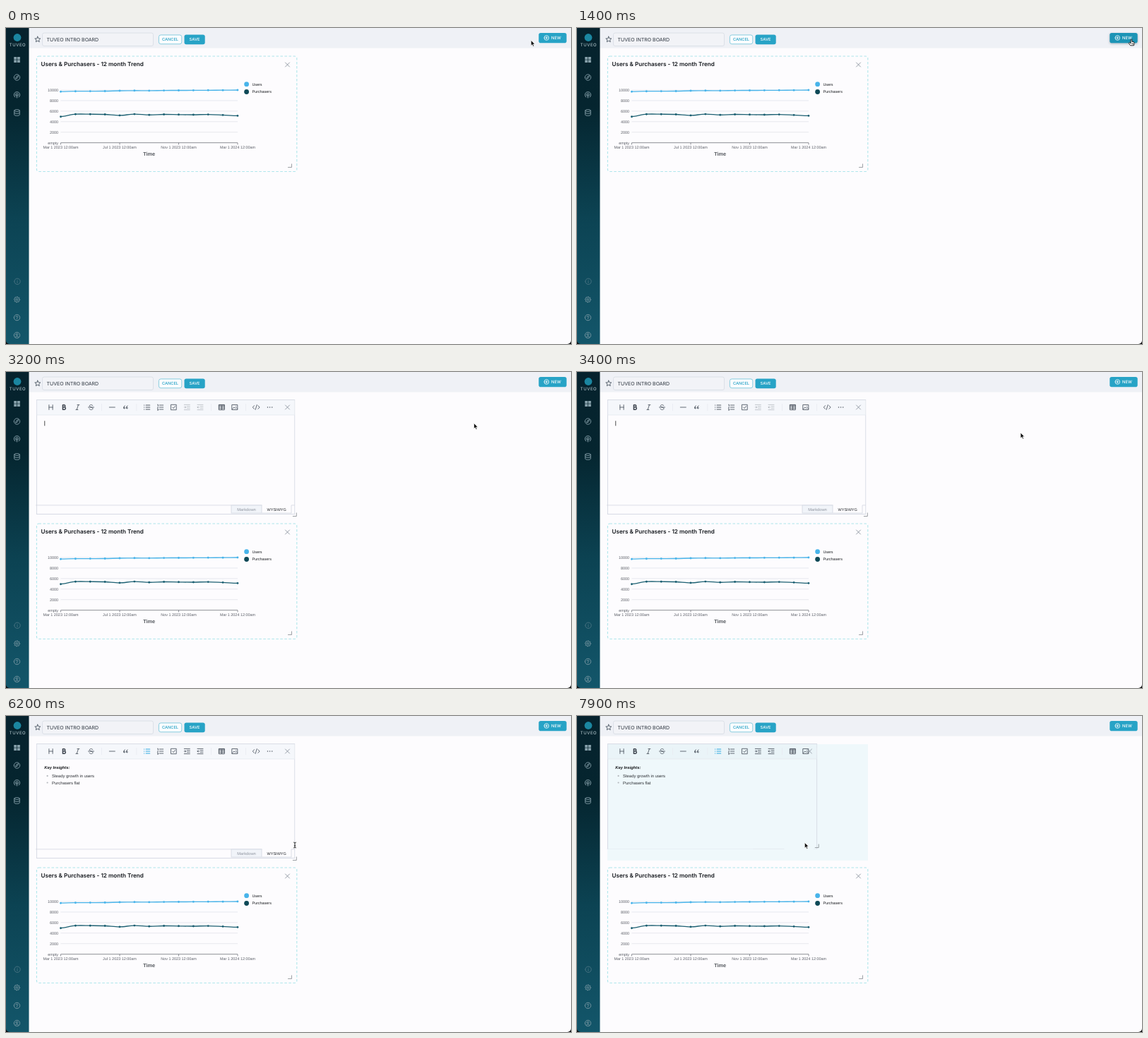
These frames come from a looping animation (800 by 448 pixels, 8000 ms). An HTML page:

```html
<!DOCTYPE html>
<html lang="en">
<head>
<meta charset="utf-8">
<title>Dashboard</title>
<style>
html, body { margin: 0; width: 100%; height: 100%; overflow: hidden; background: #fdfcfe; }
svg { display: block; width: 800px; height: 448px; text-rendering: geometricPrecision; }
text { font-family: Inter, sans-serif; }
.chart, .chart text, .doc text { font-family: "Liberation Sans", Arial, sans-serif; }
.line { fill: none; stroke: currentColor; stroke-linecap: round; stroke-linejoin: round; }
</style>
</head>
<body>
<svg id="stage" viewBox="0 0 800 448" xmlns="http://www.w3.org/2000/svg"></svg>
<script>
const LOOP = 8000, STEP = 100;
const stage = document.getElementById('stage');

// Markup helpers
const rect = (x, y, w, h, fill, more = '') =>
  `<rect x="${x}" y="${y}" width="${w}" height="${h}" fill="${fill}" ${more}/>`;
const text = (x, y, size, fill, str, more = '') =>
  `<text x="${x}" y="${y}" font-size="${size}" fill="${fill}" ${more}>${str}</text>`;
const dot = (x, y, r, fill, more = '') =>
  `<circle cx="${x}" cy="${y}" r="${r}" fill="${fill}" ${more}/>`;
const icon = (x, y, color, d, width = 0.9, id = '') =>
  `<path ${id && `id="${id}"`} class="line" transform="translate(${x} ${y})" color="${color}" stroke-width="${width}" d="${d}"/>`;
const ring = (r, x = 0, y = 0) =>
  `M${x - r} ${y}a${r} ${r} 0 1 0 ${2 * r} 0a${r} ${r} 0 1 0 ${-2 * r} 0`;
const MID = 'text-anchor="middle"', END = 'text-anchor="end"';
const CROSS = 'M-3 -3L3 3M3 -3L-3 3';
const PICTURE = 'M-3.8 -3.5h7.6v7h-7.6zM-3.4 2.4l2.3 -2.6l1.6 1.7l1.3 -1.2l1.8 2M1.5 -1.4h.3';

function starPath(r) {
  let d = '';
  for (let i = 0; i < 10; i++) {
    const a = Math.PI * (i / 5 - 0.5), k = i % 2 ? r * 0.46 : r;
    d += (i ? 'L' : 'M') + (k * Math.cos(a)).toFixed(2) + ' ' + (k * Math.sin(a)).toFixed(2);
  }
  return d + 'z';
}

function gearPath() {
  let d = ring(1.4);
  for (let i = 0; i <= 32; i++) {
    const a = i * Math.PI / 16, r = i % 4 < 2 ? 4.1 : 3.1;
    d += (i ? 'L' : 'M') + (r * Math.cos(a)).toFixed(2) + ' ' + (r * Math.sin(a)).toFixed(2);
  }
  return d;
}

function sidebar() {
  const c = '#86a0aa', dim = '#527987';
  return rect(0, 0, 32.5, 448, 'url(#side)') +
    dot(16, 13.5, 5.4, '#1b86a0') +
    text(16.5, 25.6, 6, '#c3d5da', 'TUVEO', `${MID} letter-spacing=".55"`) +
    [[11.2, 41], [15.9, 41], [11.2, 45.3], [15.9, 45.3]].map(p => rect(...p, 4, 3.7, c)).join('') +
    icon(15.5, 70, c, ring(4.2) + 'M2 -2L.8 .8L-2 2L-.8 -.8z') +
    icon(15.5, 95, c, 'M-2.6 3.1a4.2 4.2 0 1 1 5.2 0M-1.6 1.2a2.1 2.1 0 1 1 3.2 0M0 .2V4' + ring(0.5), 1) +
    icon(15.5, 120, c, 'M-3.8 -3a3.8 1.4 0 1 0 7.6 0a3.8 1.4 0 1 0 -7.6 0V3a3.8 1.4 0 0 0 7.6 0V-3M-3.8 0a3.8 1.4 0 0 0 7.6 0') +
    icon(16, 359.3, dim, ring(4.2) + 'M0 -.4V2M0 -2v.1', 0.8) +
    icon(15.5, 385, c, gearPath(), 0.8) +
    icon(15.5, 410.5, c, ring(4.2) + 'M-1.3 -.9a1.3 1.3 0 1 1 1.9 1.1q-.6 .3 -.6 .9M0 2.3v.1', 0.8) +
    icon(15.5, 435.5, c, ring(4.2) + ring(1.4, 0, -1) + 'M-2.6 3a2.8 2.2 0 0 1 5.2 0', 0.8);
}

function header() {
  const blue = '#27a3c6';
  return rect(32.5, 0, 767.5, 28.5, '#eff1f6') +
    icon(44.8, 16.3, '#4d5865', starPath(4.2), 0.9) +
    rect(51.5, 7, 157, 18.5, '#f2f3f7', 'rx="2.5" stroke="#dadee6" stroke-width=".9"') +
    text(57.5, 18.9, 7, '#2e3640', 'TUVEO INTRO BOARD') +
    rect(216.4, 9.9, 32.4, 12.8, '#fafcfe', 'rx="2.8" stroke="#7fcadd" stroke-width=".9"') +
    text(232.5, 18.3, 5.7, blue, 'CANCEL', `${MID} font-weight="500"`) +
    rect(252.5, 9.5, 29.2, 13.8, blue, 'rx="2.8"') +
    text(267, 18.4, 5.75, '#fff', 'SAVE', `${MID} font-weight="500"`) +
    rect(754.3, 7, 39.4, 14.2, blue, 'id="newBtn" rx="2.8"') +
    icon(765.3, 14, '#fff', ring(3.3) + 'M-1.6 0h3.2M0 -1.6v3.2', 0.8) +
    text(779, 16.1, 5.85, '#fff', 'NEW', `${MID} font-weight="500"`);
}

// Smooth curve through evenly spaced points
function series(ys, color) {
  const px = i => 77.5 + i * 20.87;
  const at = i => ys[Math.max(0, Math.min(ys.length - 1, i))];
  let d = `M${px(0)} ${ys[0]}`, marks = '';
  ys.forEach((y, i) => {
    marks += dot(px(i), y, 1.45, color);
    if (!i) return;
    const s0 = (at(i) - at(i - 2)) / 6, s1 = (at(i + 1) - at(i - 1)) / 6;
    d += `C${px(i - 1) + 6.96} ${at(i - 1) + s0} ${px(i) - 6.96} ${y - s1} ${px(i)} ${y}`;
  });
  return `<path class="line" color="${color}" stroke-width="1.35" d="${d}"/>` + marks;
}

function chartCard() {
  const ink = '#5a5e66';
  let s = rect(43.4, 40, 368.4, 163.5, '#fdfcfe',
    'rx="3" stroke="#aee6ec" stroke-width="1.1" stroke-dasharray="3.6 2.4"') +
    text(49.5, 54, 8.15, '#14181d', 'Users &amp; Purchasers - 12 month Trend', 'font-weight="600"') +
    icon(398.5, 52, '#7d8792', CROSS, 0.8) +
    icon(404.5, 197.5, '#85898f', 'M0 -4.6V0H-5', 0.8) + '<g class="chart">';
  ['10000', '8000', '6000', '4000', '2000', 'empty'].forEach((label, i) => {
    const y = 88 + i * 14.95, axis = i === 5;
    s += rect(77.5, y - 0.4, 250.5, 0.8, axis ? '#70747c' : '#e1e3ea') +
      text(74, y + 1.8, 5.45, ink, label, END);
  });
  ['Mar 1 2023', 'Jul 1 2023', 'Nov 1 2023', 'Mar 1 2024'].forEach((day, i) => {
    const x = 77.5 + i * 83.5;
    s += rect(x - 0.4, 162.8, 0.8, 2.6, '#70747c') +
      text(x, 170.8, 5.45, ink, day + ' 12:00am', MID);
  });
  s += text(202.6, 181, 7.3, '#55595f', 'Time', `${MID} font-weight="bold"`);
  s += series([90.2, 89.7, 89.6, 89.5, 89, 88.8, 88.9, 88.6, 88.5, 88.4, 88.3, 88.2, 88], '#48b4ea');
  s += series([125.7, 122.2, 122.2, 122.5, 123.9, 122.1, 123.2, 122.5, 122.8, 123, 122.6, 123.4, 124.4], '#1c6072');
  [['Users', '#48b4ea'], ['Purchasers', '#0e4957']].forEach(([name, color], i) => {
    s += dot(340.6, 79.7 + i * 10.8, 3.4, color) + text(348.4, 81.6 + i * 10.8, 5.45, '#15181c', name);
  });
  return s + '</g>';
}

function toolbar() {
  const c = '#525a65', y = 50;
  const rows = (x0, x1) => [-3, 0, 3].map(v => `M${x0} ${v}H${x1}`).join('');
  const indent = arrow => 'M-4 -3.6h8M0 -1.2h4M0 1.2h4M-4 3.6h8' + arrow;
  return [135, 184.5, 290, 339].map(x => rect(x, 45, 0.7, 10, '#e7e9ef')).join('') +
    icon(63.5, y, c, 'M-2.6 -3.4V3.4M2.6 -3.4V3.4M-2.6 0H2.6') +
    icon(82.3, y, '#3f4650', 'M-1.9 -3.2V3.2H.7a1.75 1.75 0 0 0 0 -3.4H-1.9M-1.9 -3.2H.3a1.55 1.55 0 0 1 0 3', 1.5) +
    icon(101.3, y, c, 'M-.4 -3.4h3M-2.4 3.4h3M1.2 -3.4L-1.1 3.4') +
    icon(120.5, y, c, 'M2.4 -2.3C1.6 -4 -2.3 -3.9 -2.3 -1.7C-2.3 .2 2.5 -.3 2.5 1.9C2.5 4 -1.8 4.2 -2.6 2.1M-4 0H4') +
    icon(150.3, y, c, 'M-4 0H4') +
    icon(169.5, y, c, ring(0.9, -2, 1) + ring(0.9, 1.8, 1) + 'M-2.9 .8q0 -2 1.5 -3M.9 .8q0 -2 1.5 -3', 1) +
    icon(199.5, y, c, rows(-1.4, 4.2) + rows(-4, -3.8), 1.1, 'ul') +
    icon(218.5, y, c, rows(-1.2, 4.2) + 'M-3.9 -3.8h.7v2.2M-4 .2h1.1l-1 1.1M-4 2.6h1.1v1.6h-1.1', 0.9) +
    icon(237.5, y, c, 'M-3.7 -3.7h7.4v7.4h-7.4zM-1.9 0l1.4 1.5L2 -1.5') +
    icon(256.3, y, c, indent('M-4 0h2.4M-2.7 -1.2l1.2 1.2l-1.2 1.2'), 0.9, 'indent') +
    icon(275, y, c, indent('M-4 0h2.4M-2.9 -1.2l-1.2 1.2l1.2 1.2'), 0.9, 'outdent') +
    icon(305.5, y, c, 'M-3.8 -3.6h7.6v7.2h-7.6zM-3.8 -2.9h7.6M-3.8 -1h7.6M-3.8 1.3h7.6M0 -2V3.6', 1) +
    icon(324, y, c, PICTURE) +
    icon(354.2, y, c, 'M-2.6 -2.3L-5 0L-2.6 2.3M2.6 -2.3L5 0L2.6 2.3M1 -3.4L-1 3.4') +
    [370.5, 373.6, 376.7].map(x => dot(x, y, 0.8, c)).join('');
}

// Editor lines: text, x, baseline, typing start and end
const LINES = [
  ['Key Insights:', 54.3, 75.3, 5000, 5350],
  ['Steady growth in users', 65, 87.3, 5400, 5750],
  ['Purchasers flat', 65, 96.9, 5800, 6050]
];

function editor() {
  const edge = '#d3d8e2';
  return rect(43, 40, 369, 165, '#eff8fb', 'id="slot"') +
    '<g clip-path="url(#crop)">' +
    rect(43.4, 39.6, 365.4, 162, '#fdfcfe', `id="frame" stroke="${edge}" stroke-width=".9"`) +
    rect(43.8, 40, 364.6, 21, '#f5f7fb', 'id="bar"') +
    rect(43.8, 60.6, 364.6, 0.7, '#e2e5ec', 'id="barLine"') + toolbar() +
    icon(398.5, 50, '#808a95', CROSS, 0.8, 'close') +
    '<g class="doc">' +
    LINES.map(([, x, y], i) =>
      (i ? dot(58.6, y - 2.4, 1.1, '#b4b7bc', `id="bullet${i}"`) : '') +
      text(x, y, i ? 5.92 : 5.75, i ? '#2c2f34' : '#17191c', '',
        `id="line${i}" ${i ? '' : 'font-weight="bold" font-style="italic"'}`)).join('') +
    rect(54.4, 69.3, 0.8, 7, '#222', 'id="caret"') +
    '<g id="tabs">' +
    rect(-30, 188.5, 392.5, 0.8, edge) + rect(404, 188.5, 5, 0.8, edge) +
    rect(319, 189, 43, 11, '#f1f4f9', `stroke="${edge}" stroke-width=".8"`) +
    rect(362.4, 199.6, 42, 0.8, edge) + rect(403.6, 189, 0.8, 11, edge) +
    text(340.5, 196.9, 5.75, '#8e949f', 'Markdown', MID) +
    text(383.2, 196.9, 5.5, '#22262b', 'WYSIWYG', MID) +
    '</g></g></g>' +
    icon(0, 0, '#85898f', 'M0 -4.6V0H-5', 0.8, 'grip');
}

function menu() {
  const c = '#56616e';
  return rect(727, 24.3, 66.5, 58.3, '#fff', 'rx="3" filter="url(#shade)"') +
    rect(730.5, 44.8, 58, 16.8, '#eef1f5', 'id="pick" rx="3" stroke="#aeb7c2" stroke-width=".8"') +
    icon(739.8, 35.8, c, 'M-3.2 -2.8h4.4M-1 -2.8V3M1.2 -.6h2.6M2.5 -.6V3', 1) +
    icon(739.8, 53.3, c, PICTURE, 0.8) +
    icon(739.8, 70.5, c, 'M-3.2 -3.2H3.2L.8 0V3.2L-.8 2.2V0z') +
    ['Text Panel', 'Image Panel', 'Filter Shortcut'].map((s, i) =>
      text(746, 37.6 + i * 17.3, 5.45, '#868d98', s)).join('');
}

// Rounded lower window corners
const corners = () =>
  '<path d="M0 443V448H5A5 5 0 0 1 0 443zM800 443V448H795A5 5 0 0 0 800 443z" fill="#0a0a0c"/>';

const POINTERS = {
  arrow: '<path d="M0 0V7.9L1.8 6.3L3.1 9L4.5 8.4L3.2 5.7H5.7z" fill="#111" stroke="#fff" stroke-width=".7"/>',
  hand: '<path d="M-.9 .6a.9 .9 0 0 1 1.8 0V3.2L3 3.5a1.4 1.4 0 0 1 1.2 1.5L3.5 8.6H-1.4L-3.6 5.6a.8 .8 0 0 1 1.2 -1L-.9 5.6zM1 5.4V7M2.4 5.4V7" fill="#fff" stroke="#111" stroke-width=".9" stroke-linejoin="round"/>',
  beam: '<path class="line" color="#222" stroke-width=".9" d="M-1.5 -3.9Q0 -3.9 0 -3V3Q0 3.9 -1.5 3.9M1.5 -3.9Q0 -3.9 0 -3M0 3Q0 3.9 1.5 3.9M-.8 .8H.8"/>'
};

stage.innerHTML = `<defs>
  <linearGradient id="side" x1="0" y1="0" x2="0" y2="1">
    <stop offset="0" stop-color="#06222d"/><stop offset=".25" stop-color="#05252f"/>
    <stop offset=".6" stop-color="#0c4353"/><stop offset="1" stop-color="#13566a"/>
  </linearGradient>
  <filter id="shade" x="-20%" y="-20%" width="140%" height="150%">
    <feDropShadow dx="0" dy="1" stdDeviation="1.6" flood-color="#26323f" flood-opacity=".36"/>
  </filter>
  <clipPath id="crop"><rect id="cropBox" x="42" y="39"/></clipPath>
</defs>` + rect(0, 0, 800, 448, '#fdfcfe') + header() + sidebar() + corners() +
  `<g id="card">${chartCard()}</g><g id="editor">${editor()}</g><g id="menu">${menu()}</g>` +
  '<g id="pointer">' + Object.keys(POINTERS).map(k => `<g id="${k}">${POINTERS[k]}</g>`).join('') + '</g>';

const el = {};
stage.querySelectorAll('[id]').forEach(n => el[n.id] = n);

const clamp = v => Math.max(0, Math.min(1, v));
const ease = v => v * v * (3 - 2 * v);
const span = (t, a, b) => ease(clamp((t - a) / (b - a)));
const mix = (a, b, k) => a + (b - a) * k;
const show = (node, on) => node.setAttribute('visibility', on ? 'inherit' : 'hidden');
const set = (node, attrs) => { for (const k in attrs) node.setAttribute(k, attrs[k]); };

const PRESS = 1700, OPEN = 1900, CLOSE = 2800, INSERT = 2900, GRAB = 7100, LAG = 130;

// Pointer path: time, x, y; the last drag runs on past the loop's end
const PATH = [
  [0, 743.3, 17.3], [200, 743.3, 17.3], [1100, 785, 16.2], [OPEN, 785, 16.2],
  [2300, 764.7, 51.3], [2400, 764.7, 51.3], [2650, 761, 34], [CLOSE, 761, 34],
  [3400, 628, 86], [3600, 628, 86], [4300, 291, 92], [5500, 291, 92],
  [6200, 409, 183], [6500, 409.5, 202], [GRAB, 409.5, 202], [8300, 291.8, 171.5]
];

function pointerAt(t) {
  const i = PATH.findIndex(p => p[0] > t);
  const a = PATH[i - 1], b = PATH[i], k = span(t, a[0], b[0]);
  return [mix(a[1], b[1], k), mix(a[2], b[2], k)];
}

function draw(t) {
  const [x, y] = pointerAt(t);
  const open = t >= OPEN && t < CLOSE, dragging = t >= GRAB;
  const overNew = x > 754 && y < 21, pressed = t >= PRESS && t < OPEN;

  set(el.newBtn, {
    fill: pressed ? '#3aa9c8' : overNew ? '#1f94b6' : '#27a3c6',
    filter: overNew ? 'url(#shade)' : 'none'
  });
  show(el.menu, open);
  show(el.pick, open && y > 27);
  set(el.pick, { y: y > 44 ? 44.8 : 27.4 });

  set(el.card, { transform: `translate(0 ${175 * span(t, INSERT - 50, INSERT + 200)})` });
  show(el.editor, t >= INSERT);

  // The panel corner trails the pointer while it is dragged
  const [gx, gy] = pointerAt(Math.max(GRAB, t - LAG));
  const right = gx - 0.5, gripY = gy + 2.5, w = right - 43;
  show(el.slot, dragging);
  set(el.frame, { width: w - 0.6, fill: dragging ? 'none' : '#fdfcfe' });
  set(el.bar, { width: w - 1.4, fill: dragging ? '#eaf4f8' : '#f5f7fb' });
  set(el.barLine, { width: w - 1.4 });
  set(el.cropBox, { width: right - 41.4, height: gripY + 2 - 39 });
  set(el.close, { transform: `translate(${right - 10.5} 50)` });
  set(el.tabs, { transform: `translate(${right - 409} 0)` });
  set(el.grip, { transform: `translate(${right + 2.3} ${gripY})` });

  // Typing
  LINES.forEach(([str, , , from, to], i) => {
    const n = Math.ceil(str.length * clamp((t - from) / (to - from)));
    el['line' + i].textContent = str.slice(0, n);
    if (i) show(el['bullet' + i], t >= from);
  });
  const inList = t >= LINES[1][3];
  show(el.caret, t >= 3100 && t < 5000 && (t - 3100) % 1000 < 500);
  set(el.ul, { color: inList ? '#2ea9e2' : '#525a65' });
  [el.indent, el.outdent].forEach(n => set(n, { opacity: inList ? 1 : 0.35 }));

  const overText = t >= INSERT && t < 6400 && x < 412;
  const kind = overNew || open ? 'hand' : overText ? 'beam' : 'arrow';
  for (const name in POINTERS) show(el[name], name === kind);
  set(el.pointer, { transform: `translate(${x} ${y})` });
}

function tick() {
  draw(Math.floor(performance.now() % LOOP / STEP) * STEP);
  requestAnimationFrame(tick);
}
tick();
</script>
</body>
</html>
```
